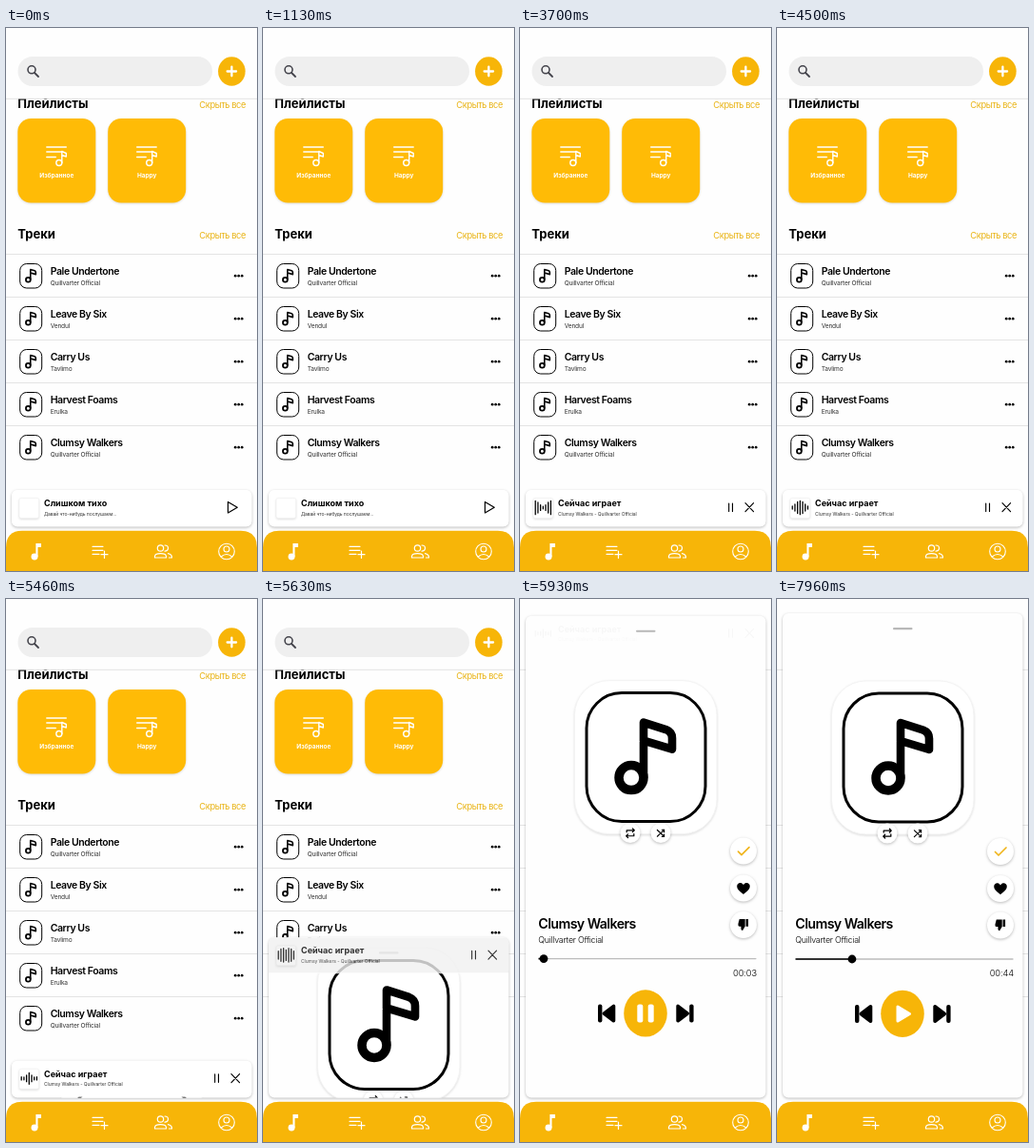
Animation, 264 px wide and 570 px high, one loop 8 s. Source, as an HTML page:

```html
<!DOCTYPE html>
<html lang="ru">
<head>
<meta charset="utf-8">
<title>Music player</title>
<style>
  html, body { margin: 0; width: 100%; height: 100%; overflow: hidden; background: #fefefe; }
  svg { display: block; width: 264px; height: 570px; }
  text { font-family: Inter, "Open Sans", sans-serif; fill: #000; }
  .heading { font-size: 13px; font-weight: 700; }
  .link { font-size: 9.3px; letter-spacing: -.4px; fill: #e9b416; text-anchor: end; }
  .card { font-size: 6.5px; font-weight: 700; fill: #fff; text-anchor: middle; }
  .track { font-size: 10.5px; font-weight: 600; letter-spacing: -.42px; }
  .artist { font-size: 6.6px; letter-spacing: -.18px; fill: #333; }
  .now { font-size: 9px; font-weight: 700; }
  .small { font-size: 5px; letter-spacing: -.07px; fill: #333; }
  .song { font-size: 14.2px; font-weight: 600; letter-spacing: -.57px; }
  .by { font-size: 8.9px; font-weight: 300; letter-spacing: -.25px; }
  .time { font-size: 9.3px; font-weight: 300; letter-spacing: -.1px; text-anchor: end; }
  .line { fill: none; stroke-linecap: round; stroke-linejoin: round; }
  .soft { filter: drop-shadow(0 1px 1.5px #0004); }
  .faint { filter: drop-shadow(0 1px 1px #0002); }
</style>
</head>
<body>
<svg id="stage" viewBox="0 0 264 570"></svg>
<script>
const LOOP = 8000;
const YELLOW = '#f7b508';
const ARTIST = 'Quillvarter Official';
const SONG = 'Clumsy Walkers';
const TRACKS = [
  ['Pale Undertone', ARTIST], ['Leave By Six', 'Vendul'], ['Carry Us', 'Tavlimo'],
  ['Harvest Foams', 'Erulka'], [SONG, ARTIST]
];
const BARS = 7;

const label = (cls, x, y, str, id = '') =>
  `<text class="${cls}" x="${x}" y="${y}"${id && ` id="${id}"`}>${str}</text>`;
const line = (d, color = '#000', width = 1) =>
  `<path class="line" d="${d}" stroke="${color}" stroke-width="${width}"/>`;
const at = (x, y, body, scale = 1) =>
  `<g transform="translate(${x} ${y}) scale(${scale})">${body}</g>`;
const disc = (x, y, r) => `<circle class="soft" cx="${x}" cy="${y}" r="${r}" fill="#fff"/>`;

// Note drawn around the centre of its cover.
const note =
  `<circle cx="-15.5" cy="21.5" r="13" fill="none" stroke="#000" stroke-width="9.5"/>` +
  line('M-2.5 21V-36.5L21 -29Q27.5 -26.5 27.5 -20V-8.5L-2.5 -17.5', '#000', 8.6);

function playlistCard(x, name) {
  return at(x, 95,
    `<rect class="faint" width="82" height="88.5" rx="14" fill="#ffbb06"/>` +
    line('M30.5 30H51M30.5 35H46M30.5 40.5H40', '#fff', 1.4) +
    `<circle cx="43.5" cy="46.5" r="3" fill="none" stroke="#fff" stroke-width="1.4"/>` +
    line('M46.5 46.5V34.5L51 36.5V40L46.5 38.5', '#fff', 1.4) +
    label('card', 41, 62, name));
}

function trackRow([title, artist], i) {
  const y = 237.5 + 45 * i;
  return at(0, y,
    line('M0 0H264', '#dedede', .8) +
    `<rect x="14.7" y="10" width="23" height="25.5" rx="7" fill="#fff" stroke="#000"/>` +
    at(26.2, 22.7, note, .185) +
    label('track', 46.7, 21, title) + label('artist', 46.7, 32.3, artist) +
    [241.2, 244.7, 248.2].map(x => `<circle cx="${x}" cy="22.7" r="1.35"/>`).join(''));
}

const page =
  label('heading', 12.3, 84, 'Плейлисты') + label('link', 252, 84.3, 'Скрыть все') +
  `<rect width="264" height="74" fill="#fefefe"/>` + line('M0 74.3H264', '#dcdcdc', .8) +
  `<rect x="12.5" y="30" width="204.5" height="31" rx="15.5" fill="#efefef"/>` +
  `<circle cx="27" cy="43.8" r="4" fill="none" stroke="#44444c" stroke-width="1.6"/>` +
  line('M30 47L34 51', '#44444c', 1.8) +
  `<ellipse cx="237.4" cy="45.5" rx="14.3" ry="15.3" fill="${YELLOW}"/>` +
  line('M232.7 45.5H242.1M237.4 40.7V50.3', '#fff', 2.3) +
  playlistCard(12.3, 'Избранное') + playlistCard(107.2, 'Happy') +
  label('heading', 12.3, 221, 'Треки') + label('link', 252, 221.3, 'Скрыть все') +
  TRACKS.map(trackRow).join('');

const skip = '<rect x="-9.3" y="-9.5" width="4.4" height="19" rx="2"/>' +
  '<path d="M7.2 -7.7V7.7L-3 0Z" stroke="#000" stroke-width="3.6" stroke-linejoin="round"/>';
const thumbDown = '<path d="M-5 -6H2V3L-1 8Q-3 8 -3 6V3H-5Q-7 3 -6.5 0ZM3 -6H6V3H3Z"/>';
const heart = '<path d="M0 6.3C-4 3 -6.8 .8 -6.8 -2.2C-6.8 -6 -2 -7 0 -3.6C2 -7 6.8 -6 6.8 -2.2C6.8 .8 4 3 0 6.3Z"/>';
const repeat = line('M-4 -1V-3H4M2.5 -5L4.5 -3L2.5 -1M4 1V3.3H-4M-2.5 1.3L-4.5 3.3L-2.5 5.3', '#000', 1.3);
const shuffle = line('M-4 -3.5L4 4M-4 4L-1 1.2M1 -.7L4 -3.5M1.5 -3.7H4V-1M1.5 4.2H4V1.5', '#000', 1.3);

const player =
  `<rect class="faint" x="57.5" y="86" width="149.5" height="161" rx="36" fill="#fff" stroke="#f3f3f3"/>` +
  `<rect x="70" y="99" width="125" height="135" rx="37" fill="#fff" stroke="#000" stroke-width="3"/>` +
  at(132.5, 166.5, note) +
  disc(116, 246, 10.5) + disc(148, 246, 10.5) +
  at(116, 246, repeat, .95) + at(148, 246, shuffle, .9) +
  disc(235, 265, 14) + disc(235, 304, 14) + disc(235, 342.5, 14) +
  line('M229.5 265.5L233 269L241 261', '#f0b51c', 1.7) +
  at(235, 304, heart) + at(235, 341.5, thumbDown, .85) +
  label('song', 19.3, 346, SONG) + label('by', 19.3, 361, ARTIST) +
  line('M20 378H248', '#bcbcbc', 1.3) +
  `<path id="played" stroke="#000" stroke-width="1.7"/><circle id="knob" cy="378" r="4.4"/>` +
  label('time', 249, 396, '', 'clock') +
  `<ellipse cx="132" cy="435.3" rx="22.8" ry="24.6" fill="${YELLOW}"/>` +
  `<g id="bigPause" fill="#fff"><rect x="123.3" y="426" width="6" height="19" rx="2"/><rect x="134.7" y="426" width="6" height="19" rx="2"/></g>` +
  `<path id="bigPlay" d="M127 428V443L139.5 435.5Z" fill="#fff" stroke="#fff" stroke-width="3" stroke-linejoin="round"/>` +
  at(91.3, 435.5, skip) + at(173.3, 435.5, skip, '-1 1');

const mini =
  `<rect x="6" width="252.5" height="38" rx="5" fill="#fff"/>` +
  `<rect class="faint" x="14" y="8.5" width="20.5" height="21" rx="2" fill="#fff" stroke="#f0f0f0" stroke-width=".6"/>` +
  `<path id="wave" class="line" stroke="#000" stroke-width="1.3"/>` +
  label('now', 40, 17, '', 'status') + label('small', 40, 26.6, '', 'detail') +
  `<g id="miniPlay">${line('M233.5 12.5V24L243.3 18.2Z', '#000', 1.2)}</g>` +
  `<g id="miniPause">${line('M219.7 14V22.5M223.5 14V22.5M237 13.7L245.6 22.7M245.6 13.7L237 22.7', '#000', 1.15)}</g>`;

const tabs =
  `<path d="M0 570V545.5Q0 527.7 17 527.7H247Q264 527.7 264 545.5V570Z" fill="${YELLOW}"/>` +
  `<ellipse cx="30" cy="555" rx="3.5" ry="3.4" fill="#fff"/><path d="M31.4 541H37V545H33.5V555H31.4Z" fill="#fff"/>` +
  line('M91 544.3H102M91 548.3H102M91 552.3H98M103.5 549V556.5M100 552.7H107', '#fff', 1.2) +
  `<circle cx="162.5" cy="546" r="3.2" fill="none" stroke="#fff" stroke-width="1.2"/>` +
  line('M156.5 556V554.5Q157 551.7 162.5 551.7T168.5 554.5V556ZM167 543Q170.5 543 170.5 546T167 549.2M170.5 551.7Q174.5 552.5 174.5 556H171.5', '#fff', 1.2) +
  `<g fill="none" stroke="#fff" stroke-width="1.1"><circle cx="232" cy="549.5" r="8.3"/><circle cx="232" cy="547" r="3"/><path d="M226.3 555Q232 550 237.7 555"/></g>`;

document.getElementById('stage').innerHTML =
  `<defs><clipPath id="sheetClip"><rect id="clipBox" x="6" width="252.5" rx="6"/></clipPath></defs>` +
  `<rect width="264" height="570" fill="#fefefe"/>${page}` +
  `<rect id="sheet" class="soft" x="6" width="252.5" rx="6" fill="#fefefe"/>` +
  `<g clip-path="url(#sheetClip)"><g id="player">${player}</g>` +
  `<g id="head"><g id="mini">${mini}</g>` +
  `<rect id="shade" x="6" width="252.5" height="37"/>` +
  `<rect id="grip" x="122" y="15" width="20.5" height="2.2" rx="1" fill="#b8b8b8"/></g></g>` + tabs;

const el = Object.fromEntries([...document.querySelectorAll('[id]')].map(node => [node.id, node]));
const set = (node, attrs) => Object.entries(attrs).forEach(([key, value]) => node.setAttribute(key, value));
const show = (node, visible) => set(node, { display: visible ? 'inline' : 'none' });
const ramp = (t, from, to) => Math.min(1, Math.max(0, (t - from) / (to - from)));
const ease = u => (1 - Math.cos(Math.PI * u)) / 2;

// Bars pulse from the middle outwards.
function wavePath(t) {
  const grow = ramp(t, 2730, 3000);
  if (!grow) return '';
  const middle = (BARS - 1) / 2;
  return Array.from({ length: BARS }, (_, i) => {
    const phase = (t - 4500) / 520 * 2 * Math.PI - Math.abs(i - middle) * .9;
    const half = grow * (4.2 + 3 * Math.cos(phase));
    return `M${16.2 + i * 2.7} ${18.5 - half}V${18.5 + half}`;
  }).join('');
}

function songSeconds(t) {
  if (t < 6800) return 3;
  return 4 + 40 * ease(ramp(t, 7180, 7630));
}

function render(t) {
  const open = ease(ramp(t, 5455, 5955));
  const drop = 470 * (1 - open);
  const top = 15 + drop;
  const box = { y: top, height: 523.5 - top };
  set(el.sheet, box);
  set(el.clipBox, box);
  set(el.head, { transform: `translate(0 ${top})` });
  set(el.player, { transform: `translate(0 ${drop - 60 * (1 - Math.exp(-drop / 51))})` });
  show(el.player, open > 0);
  set(el.mini, { opacity: Math.pow(1 - open, .7) });
  set(el.shade, { opacity: .06 * Math.sin(Math.PI * open) });
  set(el.grip, { opacity: open });

  const chosen = t >= 2560;
  const playing = t >= 3400;
  el.status.textContent = chosen ? 'Сейчас играет' : 'Слишком тихо';
  el.detail.textContent = chosen ? `${SONG} - ${ARTIST}` : 'Давай что-нибудь послушаем...';
  set(el.wave, { d: wavePath(t) });
  show(el.miniPlay, !playing);
  show(el.miniPause, playing);

  const seconds = songSeconds(t);
  const x = 21 + 1.317 * seconds;
  set(el.knob, { cx: x });
  set(el.played, { d: `M19.5 378H${x}` });
  el.clock.textContent = '00:' + String(Math.floor(seconds)).padStart(2, '0');
  const buffering = t >= 7830;
  show(el.bigPlay, buffering);
  show(el.bigPause, !buffering);
}

const start = performance.now();
function tick() {
  render((performance.now() - start) % LOOP);
  requestAnimationFrame(tick);
}
tick();
</script>
</body>
</html>
```
